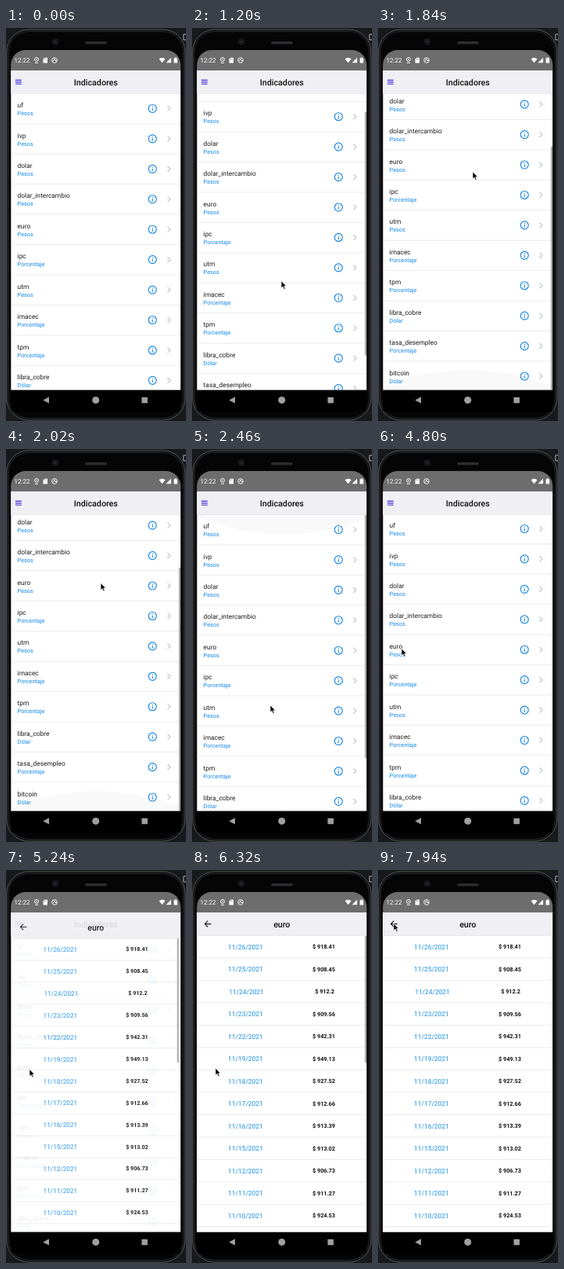
An HTML page that plays this animation: 230x500 px, repeating every 8000 ms.

```html
<!DOCTYPE html>
<html lang="es">
<head>
<meta charset="utf-8">
<title>Indicadores</title>
<style>
  html, body { margin: 0; width: 100%; height: 100%; overflow: hidden; background: #18191b; }
  svg { display: block; width: 230px; height: 500px; font-family: Roboto, sans-serif; text-rendering: geometricPrecision; }
  .heading { font-size: 10.7px; font-weight: 500; text-anchor: middle; fill: #111; }
  .name { font-size: 8.4px; fill: #1c1c1e; }
  .unit { font-size: 7.3px; fill: #1289e8; }
  .date { font-size: 8.4px; text-anchor: middle; fill: #1b8fe6; }
  .value { font-size: 7.25px; font-weight: 700; text-anchor: middle; fill: #111; }
  .clock { font-size: 8px; fill: #fff; }
</style>
</head>
<body>
<svg viewBox="0 0 230 500">
  <defs>
    <clipPath id="content"><rect x="6.2" y="54" width="217" height="406.8"/></clipPath>
    <clipPath id="body"><rect x="6.2" y="83.4" width="217" height="377.4"/></clipPath>
    <g id="info" fill="none" stroke="#1283e2" stroke-width="1.15">
      <circle r="5"/>
      <path d="M0-.6V2.7M0-2.7V-1.6"/>
    </g>
    <path id="chevron" d="M-1.8-3.4L1.7 0L-1.8 3.4" fill="none" stroke="#c2c5ca" stroke-width="1.2"/>
    <g id="headerBar">
      <rect x="6.2" y="54" width="217" height="29.4" fill="#efeff4"/>
      <path d="M6.2 83.4H223.2" stroke="#dcdce1" stroke-width=".6"/>
    </g>
  </defs>

  <!-- phone -->
  <rect x=".8" y="2" width="228" height="497" rx="28" fill="#101113" stroke="#55565a"/>
  <rect x="3.2" y="4.6" width="223.2" height="491.8" rx="25.5" fill="#050506" stroke="#26272a"/>
  <path d="M230 8H226.8V15H230" fill="none" stroke="#b0b1b3"/>
  <circle cx="63" cy="17.5" r="4.6" fill="#15161a"/>
  <circle cx="63" cy="17.5" r="1.8" fill="#24272d"/>
  <rect x="101" y="17" width="28" height="3.6" rx="1.8" fill="#2b2c2e"/>

  <!-- status bar -->
  <path d="M6.2 54V47A19 19 0 0 1 25.2 28H204.2A19 19 0 0 1 223.2 47V54Z" fill="#6d6d6d"/>
  <text class="clock" x="10.5" y="44">12:22</text>
  <g fill="none" stroke="#fff" stroke-width=".9">
    <circle cx="39" cy="40" r="2.5"/><path d="M39 38.8V41M37 44.4H41"/>
    <circle cx="62" cy="41" r="3.3"/><path d="M60.3 42.2L62 39L63 41.5H65"/>
  </g>
  <path d="M47.5 39.5L49.3 37.7H53V44.5H47.5Z" fill="#fff"/>
  <path d="M49.5 38.7V40.2M51.2 38.7V40.2" stroke="#6d6d6d" stroke-width=".7"/>
  <path d="M195.5 39.3Q199.5 36 203.5 39.3L199.5 44.3ZM204.5 44.3L211 37.7V44.3ZM214.5 38.5H215.7V37.5H217.7V38.5H219V44.5H214.5Z" fill="#fff"/>

  <!-- list screen -->
  <g clip-path="url(#content)">
    <rect x="6.2" y="54" width="217" height="407" fill="#fff"/>
    <g clip-path="url(#body)">
      <g id="list"></g>
      <path id="glowTop" d="M0 83Q122 135 235 83Z" fill="#000" fill-opacity=".022"/>
      <path id="glowBottom" d="M-8 461Q115 409 238 461Z" fill="#000" fill-opacity=".022"/>
      <rect id="listBar" x="220.8" y="83.4" width="2.2" height="310" fill="#8e8e8e"/>
    </g>
    <use href="#headerBar"/>
    <path d="M12 66.4H19.8M12 68.8H19.8M12 71.2H19.8" stroke="#402bdc" stroke-width="1.15"/>
    <text class="heading" x="114.8" y="72.7">Indicadores</text>

    <!-- detail screen -->
    <g id="detail">
      <rect x="6.2" y="54" width="217" height="407" fill="#fff"/>
      <g id="quotes"></g>
      <rect id="detailBar" x="220.8" y="83.4" width="2.2" height="161.6" fill="#8e8e8e"/>
      <use href="#headerBar"/>
      <path d="M24.5 68.6H16.5M20.3 64.7L16.4 68.6L20.3 72.5" fill="none" stroke="#1c1c1e" stroke-width="1.1"/>
      <text class="heading" x="114.8" y="72.7">euro</text>
    </g>
  </g>

  <!-- navigation bar -->
  <path d="M6.2 460.8H223.2V484Q223.2 488 219 488H10.5Q6.2 488 6.2 484Z" fill="#000"/>
  <g fill="#a0a0a0">
    <path d="M47.3 473.4L55 469.2V477.6Z"/>
    <circle cx="114.7" cy="473.4" r="4.5"/>
    <rect x="173.4" y="469.7" width="7.5" height="7.5" rx=".6"/>
  </g>

  <path id="cursor" d="M0 0V9L2.1 7.2L3.6 10.6L5.2 9.9L3.7 6.6H6.5Z" fill="#000" stroke="#fff" stroke-width=".7"/>
</svg>
<script>
const LOOP = 8000, TOP = 83.4, LEFT = 6.2, RIGHT = 223.2;
const ROW = 38.43, QUOTE_ROW = 28.5, MAX_SCROLL = 82.2;
const el = id => document.getElementById(id);

const indicators = [
  ['uf', 'Pesos'], ['ivp', 'Pesos'], ['dolar', 'Pesos'], ['dolar_intercambio', 'Pesos'],
  ['euro', 'Pesos'], ['ipc', 'Porcentaje'], ['utm', 'Pesos'], ['imacec', 'Porcentaje'],
  ['tpm', 'Porcentaje'], ['libra_cobre', 'Dólar'], ['tasa_desempleo', 'Porcentaje'], ['bitcoin', 'Dólar']
];
const quotes = [
  ['26', '918.41'], ['25', '908.45'], ['24', '912.2'], ['23', '909.56'], ['22', '942.31'],
  ['19', '949.13'], ['18', '927.52'], ['17', '912.66'], ['16', '913.39'], ['15', '913.02'],
  ['12', '906.73'], ['11', '911.27'], ['10', '924.53']
];

const divider = y => `<path d="M${LEFT} ${y}H${RIGHT}" stroke="#e3e3e7" stroke-width=".7"/>`;

el('list').innerHTML = indicators.map(([name, unit], i) => {
  const y = TOP + i * ROW;
  return `<text class="name" x="14.6" y="${y + 17.7}">${name}</text>
    <text class="unit" x="14.6" y="${y + 27.7}">${unit}</text>
    <use href="#info" x="187.2" y="${y + 19.1}"/>
    <use href="#chevron" x="208.2" y="${y + 19.1}"/>${divider(y + ROW)}`;
}).join('');

el('quotes').innerHTML = quotes.map(([day, value], i) => {
  const y = TOP + i * QUOTE_ROW;
  const shift = (6 - value.length) * 1.1; // shorter values leave more room around both columns
  return `<text class="date" x="${68.4 + shift}" y="${y + 17.4}">11/${day}/2021</text>
    <text class="value" x="${168.5 + shift}" y="${y + 16.7}">$ ${value}</text>${divider(y + QUOTE_ROW)}`;
}).join('');

// Tracks are [time, value, ...] steps with linear motion between them.
const tracks = {
  cursor: [[100, 0, 250], [360, 114, 350], [540, 114, 354], [1200, 114, 322], [1840, 121, 183],
    [2100, 121, 165], [2180, 119, 168], [2460, 100, 326], [2640, 100, 340], [2780, 100, 339],
    [3000, 100, 339], [3200, 88, 322], [3500, 48, 272], [3800, 28, 252], [4100, 30, 254],
    [6320, 30, 253], [6500, 25, 93], [6780, 25, 93], [7100, 21, 72], [7420, 20, 68]],
  scroll: [[560, 0], [1200, 28], [1455, MAX_SCROLL], [2180, MAX_SCROLL], [2330, 0], [2660, 0], [2700, 1]],
  glowBottom: [[1455, 0], [1800, 1], [2100, 1], [2200, 0]],
  glowTop: [[2330, 0], [2450, 1], [2640, 1], [2780, 0]],
  listBar: [[560, 0], [620, .75], [3000, .75], [3260, 0]],
  detailBar: [[7700, .75], [7960, 0]]
};

function sample(steps, t) {
  const next = steps.findIndex(step => step[0] > t);
  if (next === 0) return steps[0].slice(1);
  if (next < 0) return steps.at(-1).slice(1);
  const a = steps[next - 1], b = steps[next];
  const k = (t - a[0]) / (b[0] - a[0]);
  return a.slice(1).map((v, i) => v + (b[i + 1] - v) * k);
}

const clamp = v => Math.min(1, Math.max(0, v));

function render(t) {
  const [x, y] = sample(tracks.cursor, t);
  el('cursor').setAttribute('transform', `translate(${x} ${y})`);
  el('cursor').style.display = t < 100 ? 'none' : '';

  const [scroll] = sample(tracks.scroll, t);
  el('list').setAttribute('transform', `translate(0 ${-scroll})`);
  el('listBar').setAttribute('y', TOP + scroll * .82);
  for (const id of ['glowBottom', 'glowTop', 'listBar', 'detailBar'])
    el(id).setAttribute('opacity', sample(tracks[id], t)[0]);

  const open = 1 - (1 - clamp((t - 5000) / 740)) ** 4;
  const scale = .9 + .1 * open;
  el('detail').style.display = open > 0 ? '' : 'none';
  el('detail').setAttribute('opacity', clamp(open * 1.15));
  el('detail').setAttribute('transform',
    `translate(114.75 257.5) scale(${scale}) translate(-114.75 -257.5)`);
}

const start = performance.now();
function tick() {
  render((performance.now() - start) % LOOP);
  requestAnimationFrame(tick);
}
tick();
</script>
</body>
</html>
```
